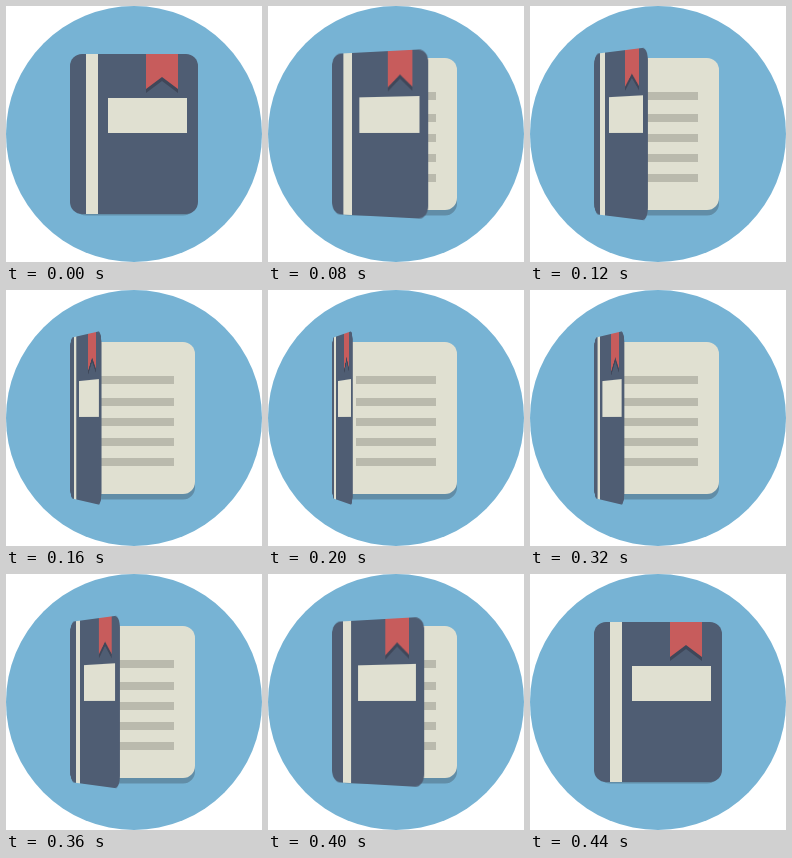
Animation, 256 px wide and 256 px high, one loop 1.08 s. Source, as an HTML page:

```html
<!DOCTYPE html>
<html lang="en">
<head>
<meta charset="utf-8">
<title>Opening notebook</title>
<style>
  html, body { margin: 0; width: 100%; height: 100%; overflow: hidden; background: #fff; }
  #stage { position: relative; width: 256px; height: 256px; perspective: 1500px; }
  svg { position: absolute; display: block; }
  #back { left: 0; top: 0; }
  #cover { left: 64px; top: 48px; transform-origin: 0 50%; }
</style>
</head>
<body>
<div id="stage">
  <svg id="back" width="256" height="256">
    <circle cx="128" cy="128" r="128" fill="#77b3d4"/>
    <rect x="68" y="57" width="121" height="152.5" rx="12" fill="#231f20" opacity=".25"/>
    <rect x="68" y="52" width="121" height="152" rx="12" fill="#e0e0d1"/>
    <path d="M88 90H168M88 112H168M88 132H168M88 152H168M88 172H168" stroke="#babaad" stroke-width="8"/>
  </svg>
  <svg id="cover" width="128" height="160">
    <rect width="128" height="160" rx="12" fill="#4f5d73"/>
    <path d="M16 0h12v160h-12z M38 44h79v35h-79z" fill="#e0e0d1"/>
    <path d="M76 4h32v35l-16-12-16 12z" fill="#3f4759"/>
    <path d="M76 0h32v35l-16-12-16 12z" fill="#c75c5c"/>
  </svg>
</div>
<script>
  const LOOP = 1080, STEP = 40;
  // Cover angle in degrees for each step; closed for the rest of the loop.
  const angles = [0, 0, 42.5, 64.7, 74.5, 79, 80, 79, 75, 66.5, 45];
  const cover = document.getElementById('cover');
  const start = performance.now();

  function draw(now) {
    const time = Math.max(0, now - start) % LOOP;
    const angle = angles[Math.floor(time / STEP)] || 0;
    cover.style.transform = angle ? `rotateY(${-angle}deg)` : 'none';
    requestAnimationFrame(draw);
  }
  draw(start);
</script>
</body>
</html>
```
